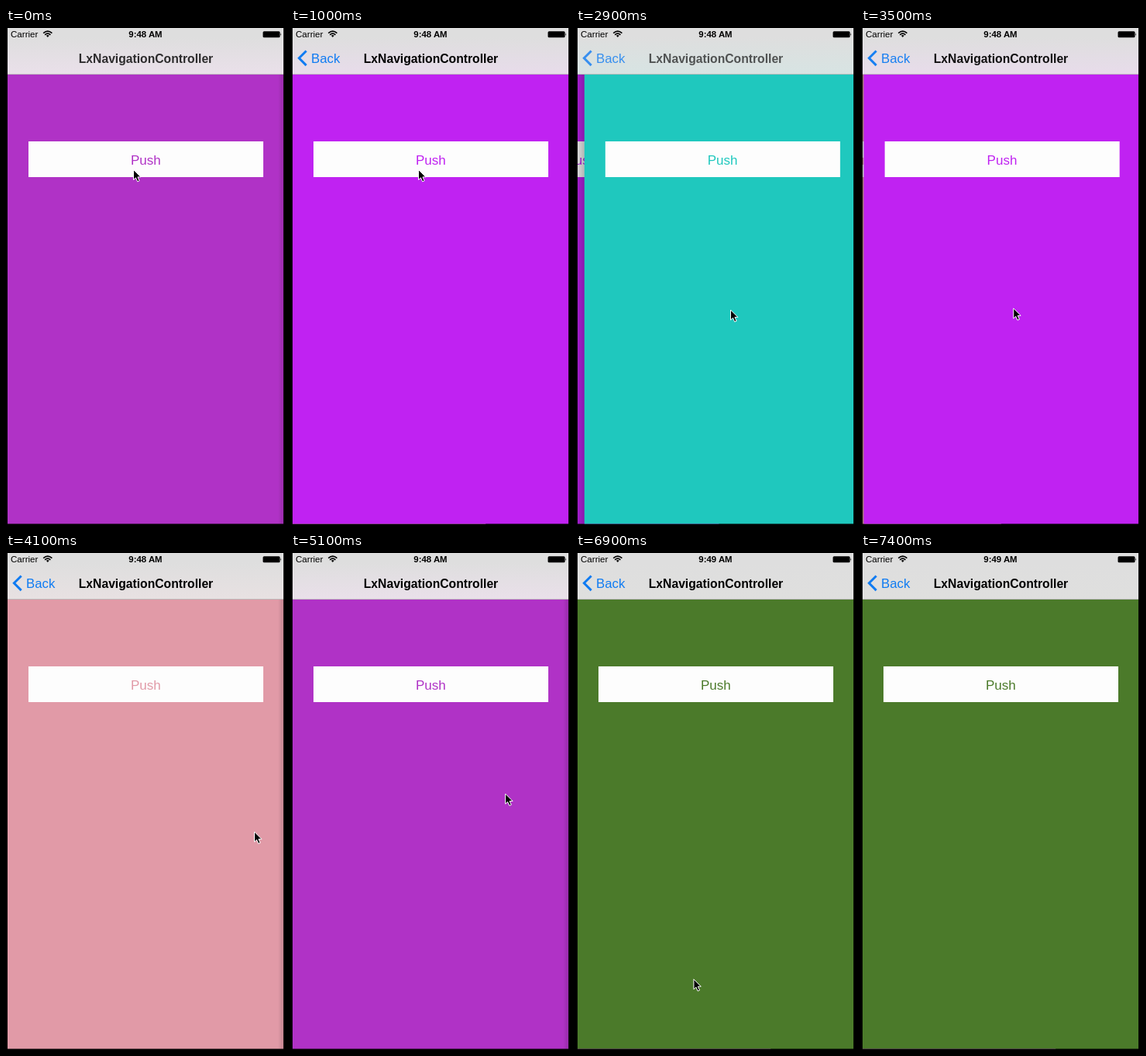
An HTML page for the animation above (7.6 s loop, 360 by 640 pixels).

```html
<!DOCTYPE html>
<html lang="en">
<head>
<meta charset="utf-8">
<title>Navigation demo</title>
<style>
html, body { margin: 0; width: 100%; height: 100%; overflow: hidden; background: #000; }
svg { display: block; width: 100%; height: 100%; }
text { font-family: "Liberation Sans", Arial, sans-serif; }
.push { font-size: 17px; text-anchor: middle; }
.title { font-size: 15.7px; font-weight: bold; text-anchor: middle; }
.back { font-size: 16.8px; fill: #0f7bf2; }
.status { font-size: 11.6px; }
.clock { font-size: 11.4px; font-weight: bold; text-anchor: middle; }
</style>
</head>
<body>
<svg viewBox="0 0 360 640">
  <defs>
    <clipPath id="stage"><rect x="2" width="356" height="638.5"/></clipPath>
    <linearGradient id="barFill" x2="0" y2="1">
      <stop offset=".2" stop-color="#dedede"/>
      <stop id="tint" offset="1"/>
    </linearGradient>
    <linearGradient id="edge">
      <stop stop-opacity="0"/>
      <stop offset="1" stop-opacity=".14"/>
    </linearGradient>
  </defs>
  <g clip-path="url(#stage)">
    <g id="under">
      <rect class="bg" x="2" width="356" height="640"/>
      <rect x="29" y="146" width="303" height="46" fill="#fdfdfd"/>
      <text class="push" x="180.3" y="175.5">Push</text>
    </g>
    <rect id="dim" x="2" width="356" height="640"/>
    <g id="over">
      <rect id="shadow" x="-5" width="7" height="640" fill="url(#edge)"/>
      <rect class="bg" x="2" width="356" height="640"/>
      <rect x="29" y="146" width="303" height="46" fill="#fdfdfd"/>
      <text class="push" x="180.3" y="175.5">Push</text>
    </g>
    <rect x="2" width="356" height="60" fill="url(#barFill)"/>
    <rect x="2" y="59.4" width="356" height=".6" fill="#000" opacity=".3"/>
    <path id="chevron" d="M19.7 29.5L10.4 38.8L19.7 48.1" fill="none" stroke="#0f7bf2" stroke-width="3"/>
    <text id="oldBack" class="back" y="45">Back</text>
    <text id="oldTitle" class="title" y="44.5">LxNavigationController</text>
    <text id="newBack" class="back" y="45">Back</text>
    <text id="newTitle" class="title" y="44.5">LxNavigationController</text>
    <text class="status" x="6" y="12.4">Carrier</text>
    <g fill="none" stroke="#000" stroke-width="1.7">
      <path d="M48.2 6.6Q53.8 1.6 59.4 6.6M50.2 8.8Q53.8 5.6 57.4 8.8"/>
      <path d="M51.9 9.8Q53.8 8.4 55.7 9.8L53.8 12Z" fill="#000" stroke="none"/>
    </g>
    <text id="clock" class="clock" x="180" y="12.4"></text>
    <rect x="331.5" y="4.2" width="22" height="8" rx="1.5"/>
    <path d="M354.3 6.5q1.6 1.7 0 3.4z"/>
    <path id="cursor" d="M0 0V13L3 10.3L5.2 15.3L7.6 14.2L5.4 9.4H9.4Z" stroke="#fff" stroke-width="1" stroke-linejoin="round"/>
  </g>
</svg>
<script>
const LOOP = 7600, STEP = 100, WIDTH = 356;
const $ = id => document.getElementById(id);

// page colour and the tint it gives to the bottom of the bar
const pages = {
  purple: { color: '#b032c6', tint: [234, 224, 234] },
  pink: { color: '#e19aa7', tint: [232, 225, 226] },
  violet: { color: '#c022f2', tint: [232, 220, 235] },
  teal: { color: '#1fc8be', tint: [215, 228, 227] },
  gray: { color: '#a6c4c8', tint: [221, 225, 225] },
  green: { color: '#4b7a2a', tint: [223, 223, 222] }
};
const ROOT = 'purple';

// start, duration, kind, from, to
const moves = [
  [20, 460, 'push', 'purple', 'pink'],
  [490, 470, 'push', 'pink', 'violet'],
  [1010, 470, 'push', 'violet', 'teal'],
  [1500, 480, 'push', 'teal', 'gray'],
  [2250, 480, 'pop', 'gray', 'teal'],
  [2853, 500, 'pop', 'teal', 'violet'],
  [3480, 500, 'pop', 'violet', 'pink'],
  [4290, 480, 'pop', 'pink', 'purple'],
  [5650, 470, 'push', 'purple', 'green']
];

// time, x, y of the pointer tip
const pointer = [
  [0, 164.5, 182.5], [2000, 164.5, 182.5], [2230, 195, 362], [2600, 320, 361],
  [2840, 193, 362], [2900, 199.5, 363], [3250, 320, 361], [3470, 195, 361],
  [3900, 320.5, 359], [4120, 320.5, 359], [4280, 195, 360], [4700, 318, 360],
  [4900, 318, 360], [5500, 158.5, 167.5], [6450, 158.5, 167.5], [7100, 150, 660]
];

const mix = (a, b, p) => a + (b - a) * p;
const smooth = p => p * p * (3 - 2 * p);
const clamp = v => Math.max(0, Math.min(1, v));
const shift = (el, x, y = 0) => el.setAttribute('transform', `translate(${x} ${y})`);

function label(id, x, alpha) {
  $(id).setAttribute('x', x);
  $(id).setAttribute('opacity', clamp(alpha));
}

function paint(layer, page) {
  layer.querySelector('.bg').setAttribute('fill', pages[page].color);
  layer.querySelector('.push').setAttribute('fill', pages[page].color);
}

function pointerAt(t) {
  const i = pointer.findIndex(k => k[0] > t);
  if (i < 0) return pointer[pointer.length - 1].slice(1);
  const a = pointer[i - 1], b = pointer[i];
  const p = smooth((t - a[0]) / (b[0] - a[0]));
  return [mix(a[1], b[1], p), mix(a[2], b[2], p)];
}

function draw(t) {
  const move = moves.filter(m => m[0] <= t).pop() || [0, 1e9, 'push', ROOT, 'pink'];
  const [start, duration, kind, from, to] = move;
  const push = kind === 'push';
  const p = clamp((t - start) / duration);
  const e = push ? 1 - (1 - p) ** 3 : smooth(p);
  const cover = push ? e : 1 - e;

  paint($('under'), push ? from : to);
  paint($('over'), push ? to : from);
  shift($('under'), -WIDTH * (push ? .3 : .5) * cover);
  shift($('over'), WIDTH * (1 - cover));
  $('shadow').setAttribute('opacity', cover < 1 ? 1 : 0);
  $('dim').setAttribute('opacity', (push ? .08 : .18) * cover);

  const tint = pages[from].tint.map((c, i) => Math.round(mix(c, pages[to].tint[i], e)));
  $('tint').setAttribute('stop-color', `rgb(${tint})`);

  const hadBack = from === ROOT ? 0 : 1, hasBack = to === ROOT ? 0 : 1;
  if (push) {
    label('oldTitle', 180.5 - 68 * e, (1 - e) * .8);
    label('newTitle', 180.5 + 312 * (1 - e), e < 1 ? e : 1);
    label('oldBack', 26 - 40 * e, hadBack * (1 - 2 * e));
    label('newBack', 26 + 80 * (1 - e), e);
    $('chevron').setAttribute('opacity', mix(hadBack, 1, e));
  } else {
    // both bars cross-fade in place
    const fade = Math.min(1, e * 40, (1 - e) * 5);
    const back = mix(hadBack, hasBack, e) * (1 - .2 * fade);
    label('oldTitle', 180.5, 0);
    label('newTitle', 180.5, 1 - .37 * fade);
    label('oldBack', 26, 0);
    label('newBack', 26, back);
    $('chevron').setAttribute('opacity', back);
  }

  $('clock').textContent = t < 5300 ? '9:48 AM' : '9:49 AM';
  shift($('cursor'), ...pointerAt(t));
}

const origin = performance.now();
function tick() {
  const t = (performance.now() - origin) % LOOP;
  draw(Math.floor(t / STEP) * STEP);
  requestAnimationFrame(tick);
}
tick();
</script>
</body>
</html>
```
